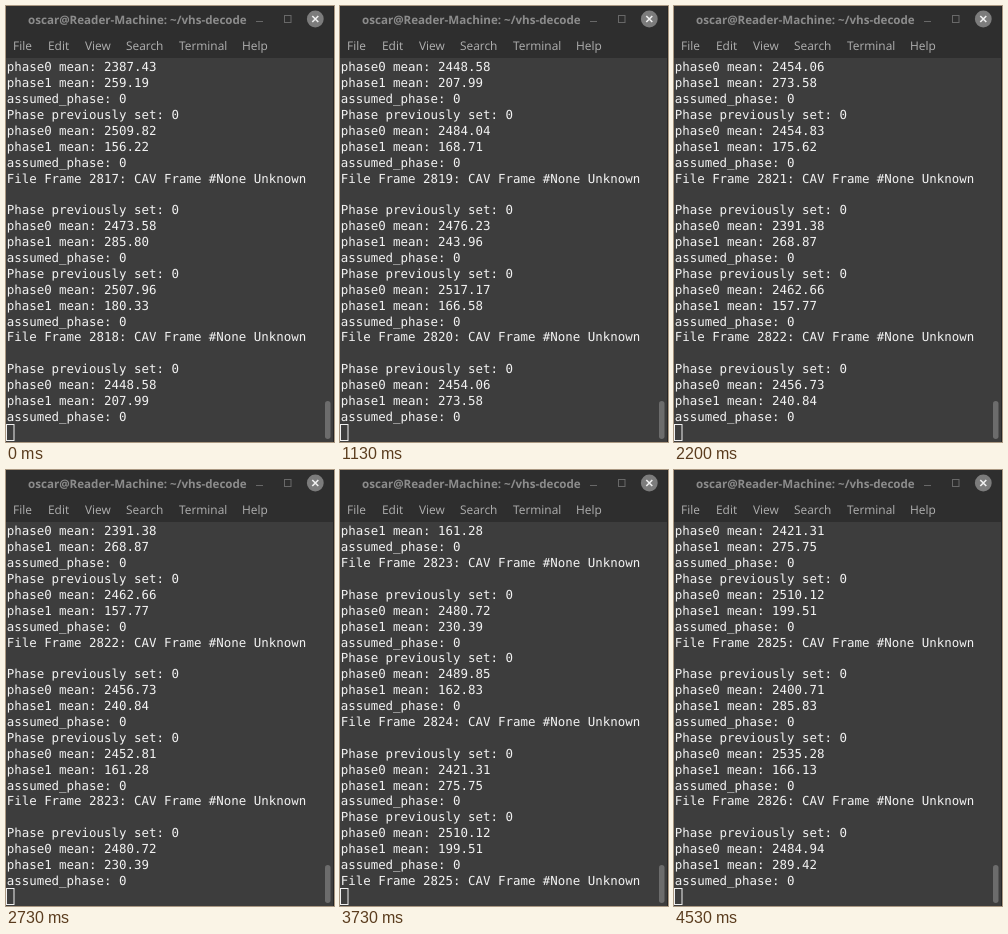
An HTML page that plays this animation: 328 by 436 pixels, repeating every 4590 ms.

```html
<!DOCTYPE html>
<html lang="en">
<head>
<meta charset="utf-8">
<title>Decoder log</title>
<style>
  html, body { margin: 0; width: 100%; height: 100%; overflow: hidden; background: #3d3d3d; }
  svg { display: block; width: 328px; height: 436px; }
  text { white-space: pre; text-rendering: geometricPrecision; }
  .title { font: 700 11.6px "Open Sans", "Noto Sans", sans-serif; fill: #8c8c8c; }
  .menu { font: 11.9px "Open Sans", "Noto Sans", sans-serif; fill: #b0b0b0; }
  .log { font: 12.45px "DejaVu Sans Mono", monospace; fill: #f2f2f2; }
</style>
</head>
<body>
<svg viewBox="0 0 328 436">
  <rect width="328" height="436" fill="#3d3d3d"/>
  <rect width="328" height="52" fill="#2e2e2e"/>
  <rect x="327" width="1" height="436" fill="#262626"/>
  <text class="title" x="22" y="17.5">oscar@Reader-Machine: ~/vhs-decode</text>
  <g fill="none" stroke="#686868">
    <path d="M250 15.5h7"/>
    <rect x="278.5" y="9.5" width="6.5" height="7"/>
  </g>
  <circle cx="309.3" cy="13" r="8.4" fill="#7c7c7c"/>
  <path d="M306.3 10l6 6m0-6l-6 6" stroke="#f0f0f0" stroke-width="1.6"/>
  <g class="menu">
    <text x="7" y="44">File</text>
    <text x="42" y="44">Edit</text>
    <text x="79" y="44">View</text>
    <text x="120" y="44">Search</text>
    <text x="173" y="44">Terminal</text>
    <text x="236" y="44">Help</text>
  </g>
  <g class="log" id="log"></g>
  <rect x="0.5" y="418.5" width="7.5" height="16" fill="none" stroke="#f0f0f0"/>
  <rect x="319" y="395" width="5.5" height="38" rx="2.75" fill="#6c6c6c"/>
</svg>
<script>
  const LOOP = 4590, TICK = 1000 / 15;
  const ROWS = 23, ROW_HEIGHT = 15.89;
  const FIELDS = 21, FIRST_FRAME = 2817, LINES_PER_STEP = 5;

  let seed = 2817;
  function around(centre, spread) {
    seed = (seed * 16807) % 2147483647;
    return (centre + spread * (2 * seed / 2147483647 - 1)).toFixed(2);
  }

  // Two fields make one video frame; the second has the stronger phase 0.
  function fieldLines(_, i) {
    const second = i % 2 === 1;
    return [
      "Phase previously set: 0",
      `phase0 mean: ${second ? around(2505, 60) : around(2440, 55)}`,
      `phase1 mean: ${second ? around(190, 35) : around(255, 50)}`,
      "assumed_phase: 0",
      ...(second ? [`File Frame ${FIRST_FRAME + (i - 1) / 2}: CAV Frame #None Unknown`, ""] : [])
    ];
  }
  const lines = Array.from({ length: FIELDS }, fieldLines).flat();

  const log = document.getElementById("log");
  const rows = Array.from({ length: ROWS }, (_, i) => {
    const row = document.createElementNS(log.namespaceURI, "text");
    row.setAttribute("x", 0.7);
    row.setAttribute("y", Math.round(65.3 + i * ROW_HEIGHT));
    return log.appendChild(row);
  });

  // Each video frame takes 8 ticks and prints in two bursts, 5 and 3 ticks apart.
  // The decoder stalls between ticks 46 and 56, then catches up.
  function stepAt(time) {
    const tick = Math.floor((time + 5) / TICK);
    const work = 4 + (tick < 56 ? Math.min(tick, 46) : tick - 3);
    const secondBurst = work % 8 >= 5 ? 1 : 0;
    return Math.max(0, 2 * Math.floor(work / 8) - 1 + secondBurst);
  }

  let shown = -1;
  function draw(now) {
    const step = stepAt(now % LOOP);
    if (step !== shown) {
      shown = step;
      rows.forEach((row, i) => { row.textContent = lines[1 + step * LINES_PER_STEP + i]; });
    }
  }

  const start = performance.now();
  function tick() {
    draw(performance.now() - start);
    requestAnimationFrame(tick);
  }
  tick();
</script>
</body>
</html>
```
